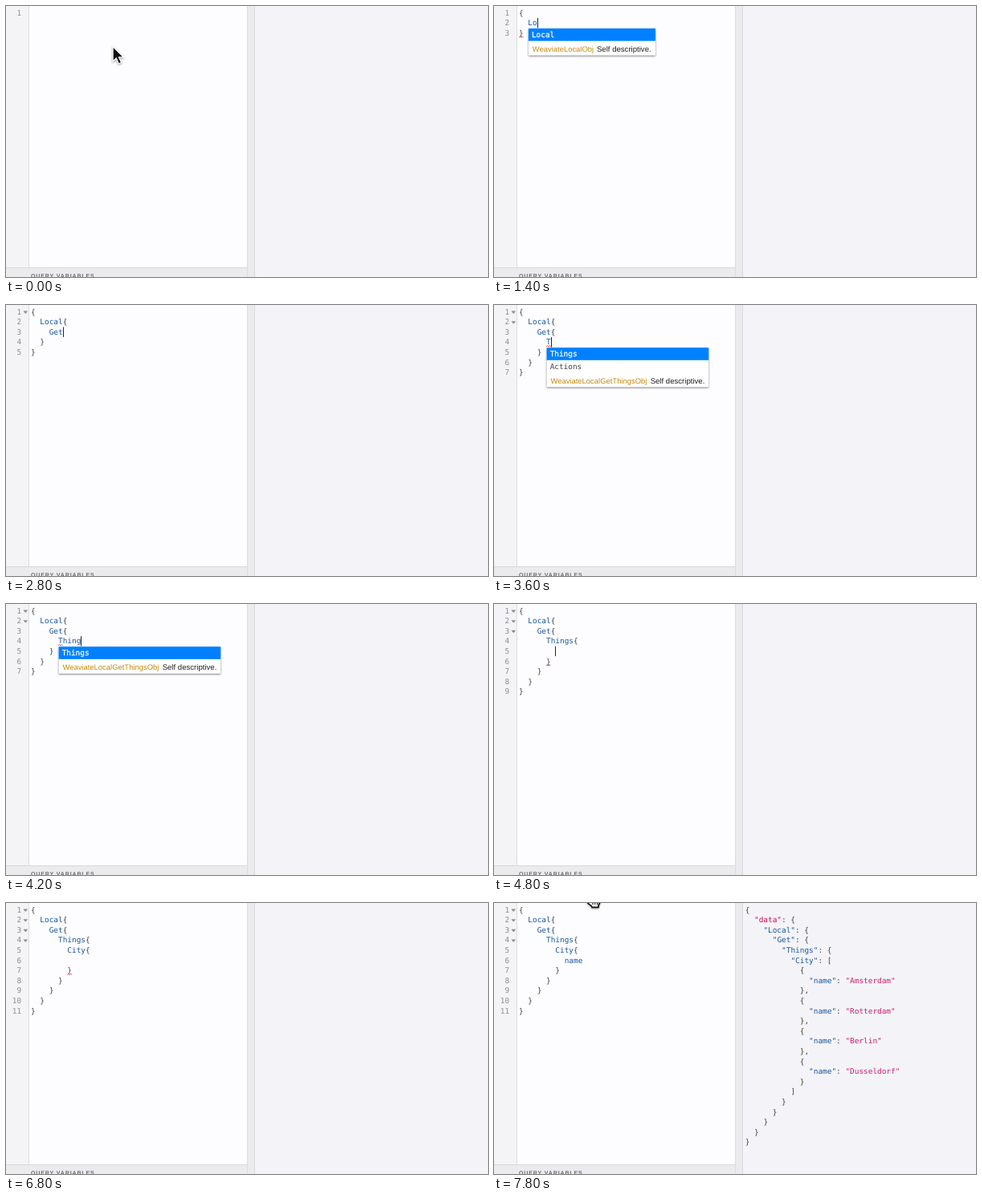
An HTML page that plays this animation: 600 px wide and 338 px high, repeating every 8 s.

```html
<!DOCTYPE html>
<html lang="en">
<head>
<meta charset="utf-8">
<title>Query editor</title>
<style>
  html, body { margin: 0; width: 100%; height: 100%; overflow: hidden; background: #f4f4f8; }
  svg { display: block; width: 600px; height: 338px; }
  text { white-space: pre; text-rendering: geometricPrecision; font: 9.42px "DejaVu Sans Mono", monospace; fill: #444; }
  .num { fill: #8e8e92; text-anchor: end; }
  .field { fill: #1a569c; }
  .def { fill: #cb0a4c; }
  .str { fill: #cc1c70; }
  .fold { fill: #8a8a8a; }
  .err { fill: none; stroke: #e0352f; stroke-width: .9; }
  .popup { filter: drop-shadow(0 1px 1.2px rgba(0, 0, 0, .5)); }
  .picked { fill: #fff; stroke: #fff; stroke-width: .25; }
  .info { font: 9.6px "Liberation Sans", Arial, sans-serif; fill: #222; }
  .type { font-size: 9.45px; fill: #c38a10; }
  .title { font: bold 7px "Liberation Sans", Arial, sans-serif; letter-spacing: .88px; fill: #6c6c70; }
  .mouse { filter: drop-shadow(0 1px 1px rgba(0, 0, 0, .4)); }
</style>
</head>
<body>
<svg viewBox="0 0 600 338">
  <rect width="600" height="338" fill="#f4f4f8"/>
  <rect x="28" width="272" height="326" fill="#fdfdff"/>
  <rect width="28" height="326" fill="#f4f3f6"/>
  <rect x="28" width="1" height="326" fill="#dddde0"/>
  <rect x="300" width="10" height="338" fill="#ebebed"/>
  <rect x="300" width="1" height="338" fill="#dcdcdf"/>
  <rect x="309" width="1" height="338" fill="#d9d9dc"/>
  <rect y="326" width="300" height="12" fill="#ebebed"/>
  <rect y="326" width="300" height="1" fill="#d8d8db"/>
  <text class="title" x="31" y="339.2">QUERY VARIABLES</text>
  <g id="view"></g>
</svg>
<script>
const LOOP = 8000, CHAR = 5.671, PITCH = 12.6, LEFT = 31, RIGHT = 312.7;
const view = document.getElementById('view');
const path = ['Local', 'Get', 'Things', 'City'];

// Completion box per depth: width, offset of the description, type, description
const boxes = [
  [158, 85, 'WeaviateLocalObj', 'Self descriptive.'],
  [173, 101, 'WeaviateLocalGetObj', 'Self descriptive.'],
  [201.5, 129, 'WeaviateLocalGetThingsObj', 'Self descriptive.'],
  [95.5, 5, '', 'A city, place or town']
];

// time, depth, typed word, folds, options
const steps = [
  [0, -1, '', 0, { caret: false, mouse: [133, 50] }],
  [200, -1, '', 0, { mouse: [133, 50] }],
  [400, -1, '{}', 0, { mouse: [133, 50] }],
  [800, 0, '', 0],
  [1000, 0, '', 0, { err: -1 }],
  [1200, 0, 'L', 0, { err: -1, hints: ['Local'] }],
  [1400, 0, 'Lo', 0, { err: -1, hints: ['Local'] }],
  [1600, 0, 'Loc', 0, { err: -1, hints: ['Local'] }],
  [1800, 0, 'Local', 0],
  [2000, 0, 'Local{}', 1],
  [2200, 1, '', 1, { err: -1 }],
  [2400, 1, 'G', 1, { hints: ['Get', 'GetMeta', 'Aggregate'] }],
  [2600, 1, 'Ge', 1, { hints: ['Get', 'GetMeta'] }],
  [2800, 1, 'Get', 1],
  [3200, 1, 'Get{}', 1],
  [3400, 2, '', 2, { err: -1 }],
  [3600, 2, 'T', 2, { err: 1, hints: ['Things', 'Actions'] }],
  [3800, 2, 'Th', 2, { err: 1, hints: ['Things'] }],
  [4000, 2, 'Thin', 2, { err: 1, hints: ['Things'] }],
  [4200, 2, 'Thing', 2, { err: 1, hints: ['Things'] }],
  [4400, 2, 'Things', 2],
  [4600, 2, 'Things{}', 2],
  [4800, 3, '', 3, { err: -1 }],
  [5000, 3, 'C', 3, { err: 1, hints: ['City'] }],
  [5200, 3, 'Ci', 3, { err: 2, hints: ['City'] }],
  [5400, 3, 'Cit', 3, { err: 2, hints: ['City'] }],
  [5600, 3, 'City', 3, { err: 2, hints: ['City'] }],
  [5800, 3, 'City', 3],
  [6000, 3, 'City{}', 3],
  [6200, 4, '', 4, { err: -1 }],
  [6400, 4, '', 4, { err: -1, caret: false }],
  [6600, 4, '', 4, { err: -1 }],
  [6800, 4, '', 4, { err: -1, caret: false }],
  [7000, 4, 'n', 4],
  [7200, 4, 'name', 4],
  [7400, 4, 'name', 4, { mouse: [133, 46] }],
  [7600, 4, 'name', 4, { mouse: [126, 14], caret: false }],
  [7800, 4, 'name', 4, { hand: true, result: true, caret: false }]
];

const base = line => 11.6 + line * PITCH;
const pad = depth => '  '.repeat(depth);
const text = (x, y, body, cls = '') => `<text class="${cls}" x="${x}" y="${y}">${body}</text>`;
const span = (cls, body) => `<tspan class="${cls}">${body}</tspan>`;

function queryLines(depth, word) {
  if (depth < 0) return [word];
  const open = path.slice(0, depth).map((name, i) => pad(i + 1) + name + '{');
  const close = Array.from({ length: depth + 1 }, (_, i) => pad(depth - i) + '}');
  return ['{', ...open, pad(depth + 1) + word, ...close];
}

function resultLines() {
  const keys = ['data', ...path];
  const out = ['{', ...keys.map((k, i) => `${pad(i + 1)}"${k}": ${k === 'City' ? '[' : '{'}`)];
  const cities = ['Amsterdam', 'Rotterdam', 'Berlin', 'Dusseldorf'];
  cities.forEach((city, i) => out.push(
    pad(6) + '{', `${pad(7)}"name": "${city}"`, pad(6) + (i < cities.length - 1 ? '},' : '}')));
  out.push(pad(5) + ']');
  for (let d = 4; d >= 0; d--) out.push(pad(d) + '}');
  return out;
}

// Leading blanks become an x offset
function codeLine(line, row, x, paint) {
  const body = line.trimStart();
  return text(x + (line.length - body.length) * CHAR, base(row), paint(body));
}

const paintQuery = s => s.replace(/\w+/, w => span('field', w));
const paintResult = s => s.replace(/"(\w+)"(:?)/g, (m, word, colon) =>
  span(!colon ? 'str' : word === 'data' ? 'def' : 'field', `"${word}"`) + colon);

function squiggle(row, col, count) {
  let d = `M${LEFT + col * CHAR} ${base(row) + 2.4}`;
  for (let i = 0; i < count * 4; i++) d += `l${CHAR / 4} ${i % 2 ? 1.2 : -1.2}`;
  return `<path class="err" d="${d}"/>`;
}

function popup(depth, hints) {
  const [width, shift, type, about] = boxes[depth];
  const x = LEFT + 2 * (depth + 1) * CHAR + .6, y = base(depth + 1) + 3.8, row = 15.6;
  const foot = y + hints.length * row;
  return `<g class="popup"><rect x="${x}" y="${y}" width="${width}" height="${foot - y + 18}" fill="#fff"/></g>`
    + `<rect x="${x}" y="${y}" width="${width}" height="${row}" fill="#0080ff"/>`
    + hints.map((h, i) => text(x + 4, y + 11 + i * row, h, i ? '' : 'picked')).join('')
    + text(x + 4.8, foot + 13.3, type, 'info type')
    + text(x + shift, foot + 13.3, about, 'info');
}

const arrow = ([x, y]) => `<path class="mouse" transform="translate(${x} ${y})" fill="#111" stroke="#fff"
  stroke-width="1.3" d="M0 .5V19L4.2 15.2L7.2 22L10.6 20.5L7.6 13.9H13.4Z"/>`;

const hand = () => `<g class="mouse" stroke-linejoin="round"><path fill="#fff" stroke="#111" stroke-width="1.7"
  d="M115.5 -3L117 .3L121.3 3.6L122 5.4H130V3L132 -1V-4Z"/>
  <path stroke="#111" stroke-width="1.1" d="M123 -3V2M125.8 -3V2M128.6 -3V2"/></g>`;

function draw([, depth, word, folds, opt = {}]) {
  const { caret = true, err = 0, hints, mouse, result } = opt;
  const lines = queryLines(depth, word);
  const row = depth + 1, col = 2 * row;
  let out = lines.map((line, i) =>
    text(19.2, base(i), i + 1, 'num') + codeLine(line, i, LEFT, paintQuery)).join('');
  for (let i = 0; i < folds; i++) out += `<path class="fold" d="M21.5 ${base(i) - 4}h5.6l-2.8 3.4z"/>`;
  if (err < 0) out += squiggle(row + 1, col - 2, 1);
  if (err > 0) out += squiggle(row, col, err);
  if (caret) {
    const at = col + word.length - (word.endsWith('}') ? 1 : 0);
    out += `<rect x="${Math.round(LEFT + at * CHAR)}" y="${base(row) - 9.3}" width="1" height="12.4" fill="#222"/>`;
  }
  if (hints) out += popup(depth, hints);
  if (result) out += resultLines().map((line, i) => codeLine(line, i, RIGHT, paintResult)).join('');
  if (mouse) out += arrow(mouse);
  if (opt.hand) out += hand();
  view.innerHTML = out;
}

let shown;
function tick() {
  const now = performance.now() % LOOP;
  const step = steps.filter(s => s[0] <= now).pop();
  if (step !== shown) draw(shown = step);
  requestAnimationFrame(tick);
}
tick();
</script>
</body>
</html>
```
